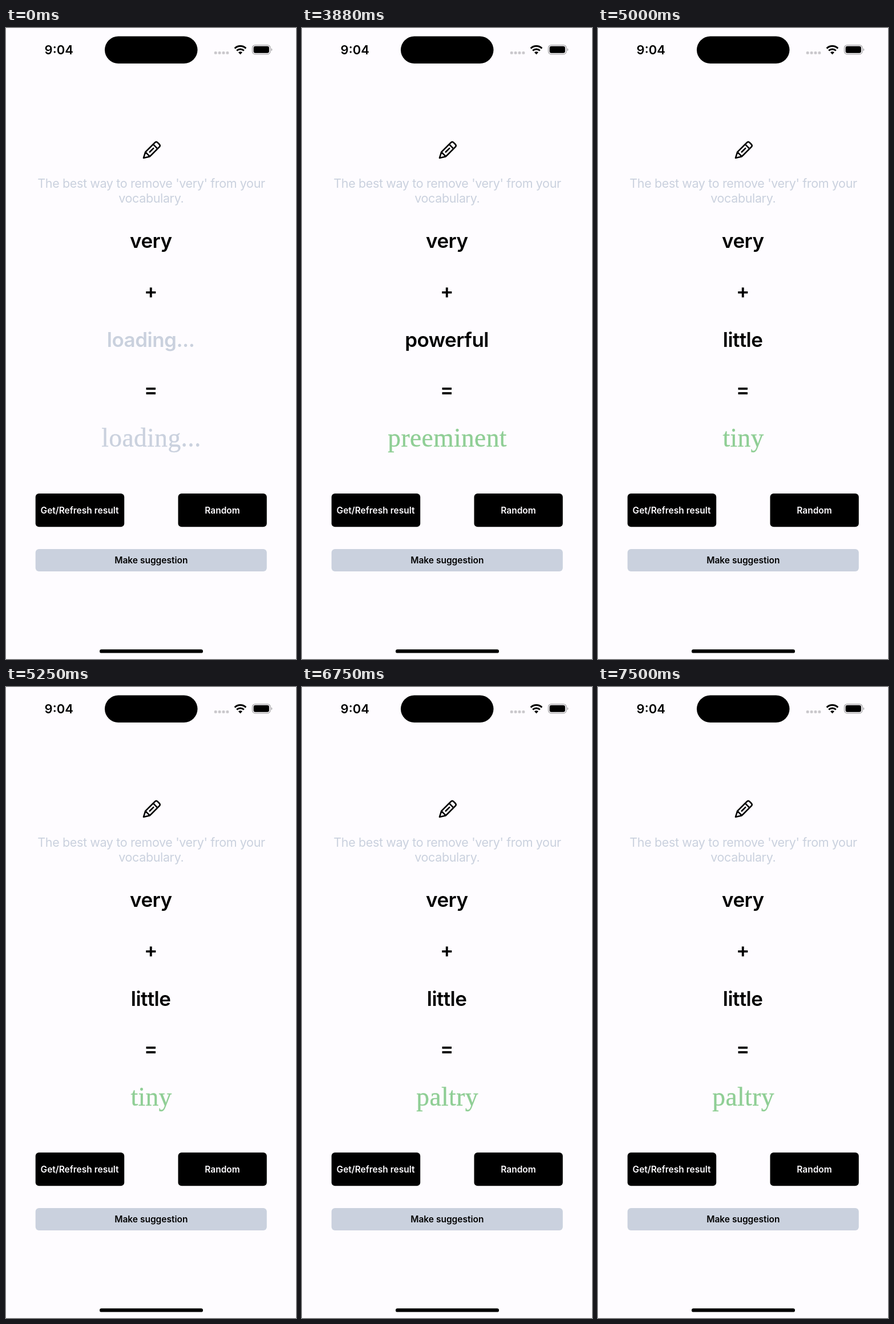
An HTML page that plays this animation: 508 by 1102 pixels, repeating every 8 s.

```html
<!DOCTYPE html>
<html lang="en">
<head>
<meta charset="utf-8">
<title>Word helper</title>
<style>
  html, body { margin: 0; width: 100%; height: 100%; overflow: hidden; background: #fefcff; }
  svg { display: block; width: 100%; height: 100%; }
  text { font-family: Inter, "Liberation Sans", sans-serif; text-anchor: middle; }
  .clock { font-size: 22px; font-weight: 600; }
  .intro { font-size: 21.5px; letter-spacing: -.37px; fill: #cad1de; }
  .word { font-size: 35px; font-weight: 600; letter-spacing: -.5px; }
  .answer {
    font-family: "Liberation Serif", serif; font-size: 45.5px; letter-spacing: .4px;
    fill: #8fce95; stroke: #8fce95; stroke-width: .35px;
  }
  .label { font-size: 15.5px; font-weight: 600; }
  .muted .word.live { fill: #cad1de; }
  .muted .answer { fill: #cad1de; stroke: #cad1de; }
  .line { fill: none; stroke: #000; stroke-width: 2.6; stroke-linecap: round; stroke-linejoin: round; }
  .wave { fill: none; stroke: #000; stroke-width: 3; }
</style>
</head>
<body>
<svg id="stage" viewBox="0 0 508 1102">
  <rect width="508" height="1102" fill="#fefcff"/>

  <!-- status bar -->
  <text class="clock" x="92.7" y="46">9:04</text>
  <rect x="173" y="14.5" width="162.5" height="47.5" rx="23.75"/>
  <g fill="#cac8cc">
    <rect x="364.8" y="41" width="4.8" height="4.8" rx="1.6"/>
    <rect x="371.7" y="41" width="4.8" height="4.8" rx="1.6"/>
    <rect x="378.6" y="41" width="4.8" height="4.8" rx="1.6"/>
    <rect x="385.5" y="41" width="4.8" height="4.8" rx="1.6"/>
  </g>
  <path class="wave" d="M400.7 35.6a14 14 0 0 1 19.6 0M404.2 39.5a9 9 0 0 1 12.6 0"/>
  <path d="M410.5 46.2l-3.5-3.6a5 5 0 0 1 7 0z"/>
  <rect x="431.5" y="29.8" width="31.5" height="16" rx="5" fill="none" stroke="#a5a4a7" stroke-width="1.3"/>
  <rect x="433.6" y="31.8" width="27.3" height="12" rx="3.2"/>
  <path d="M464.6 35.2a2.8 2.8 0 0 1 0 5.2z" fill="#a5a4a7"/>

  <!-- pencil -->
  <path class="line" d="M241 226.9l3.2-10.2 16.6-16.6q2.4-2.4 4.8 0l2.9 2.9q2.4 2.4 0 4.8l-16.6 16.6zM244.2 216.7l7.7 7.7M257.8 203.2l7.6 7.6M251.8 216.5l6.4-6.4"/>

  <text class="intro" x="254.5" y="278.5">The best way to remove 'very' from your</text>
  <text class="intro" x="254.3" y="304.5">vocabulary.</text>

  <text class="word" x="253.8" y="384">very</text>
  <text class="word" x="253.6" y="471.5">+</text>
  <text class="word live" id="word" x="253.6" y="556.7"></text>
  <text class="word" x="253.6" y="644.3">=</text>
  <text class="answer" id="answer" x="254.6" y="731"></text>

  <!-- buttons -->
  <rect x="51.7" y="813" width="155.5" height="58.3" rx="6"/>
  <rect x="301.5" y="813" width="155.3" height="58.3" rx="6"/>
  <rect x="51.7" y="910" width="405.1" height="39" rx="6" fill="#cad1de"/>
  <text class="label" x="129" y="847.7" fill="#fefcff">Get/Refresh result</text>
  <text class="label" x="379" y="847.7" fill="#fefcff">Random</text>
  <text class="label" x="254.3" y="935.2">Make suggestion</text>

  <rect x="164" y="1085.2" width="181" height="6.4" rx="3.2"/>
</svg>
<script>
  const LOOP = 8000;
  const scenes = [
    { at: 0, word: "loading...", answer: "loading...", muted: true },
    { at: 130, word: "joyful", answer: "ecstatic", muted: true },
    { at: 3880, word: "powerful", answer: "preeminent" },
    { at: 5000, word: "little", answer: "tiny" },
    { at: 6250, word: "little", answer: "slight" },
    { at: 6500, word: "little", answer: "meager" },
    { at: 6750, word: "little", answer: "paltry" },
    { at: 7000, word: "little", answer: "meager" },
    { at: 7250, word: "little", answer: "slight" },
    { at: 7500, word: "little", answer: "paltry" }
  ];
  const stage = document.getElementById("stage");
  const word = document.getElementById("word");
  const answer = document.getElementById("answer");
  const start = performance.now();
  let shown;

  function show(scene) {
    if (scene === shown) return;
    shown = scene;
    word.textContent = scene.word;
    answer.textContent = scene.answer;
    stage.classList.toggle("muted", Boolean(scene.muted));
  }

  function tick() {
    const time = (performance.now() - start) % LOOP;
    show(scenes.filter(scene => scene.at <= time).pop());
    requestAnimationFrame(tick);
  }
  tick();
</script>
</body>
</html>
```
